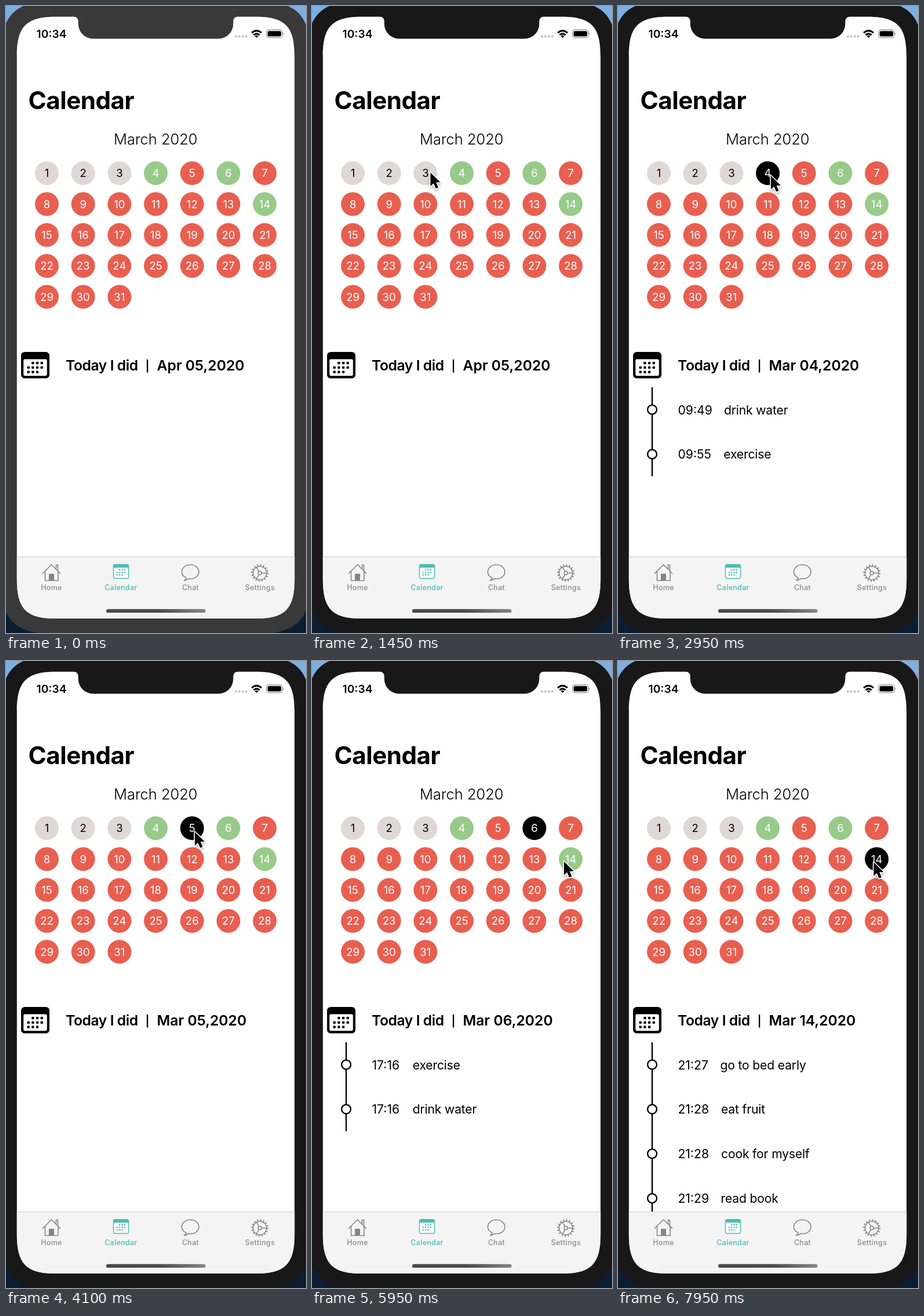
An HTML page for the animation above (8 s loop, 518x1082 px).

```html
<!DOCTYPE html>
<html lang="en">
<head>
<meta charset="utf-8">
<title>Calendar</title>
<style>
  html, body { margin: 0; width: 100%; height: 100%; overflow: hidden; background: #0c2036; }
  svg { display: block; width: 100vw; height: 100vh; font-family: Inter, Roboto, "Liberation Sans", sans-serif; }
  .mid { text-anchor: middle; }
  .day { font-size: 18.6px; }
  .heading { font-size: 24.8px; font-weight: 600; }
  .entry { font-size: 21.2px; }
  .tab { font-size: 12.6px; font-weight: 500; letter-spacing: .25px; fill: #8c8c8c; }
  .line { fill: none; stroke: #858585; stroke-width: 1.6; stroke-linejoin: round; stroke-linecap: round; }
</style>
</head>
<body>
<svg viewBox="0 0 518 1082" preserveAspectRatio="none">
  <defs>
    <linearGradient id="wall" x2="0" y2="1">
      <stop offset="0" stop-color="#7eafe2"/><stop offset=".4" stop-color="#7095bd"/>
      <stop offset=".9" stop-color="#0d2440"/><stop offset="1" stop-color="#0b1c30"/>
    </linearGradient>
    <linearGradient id="pill" x2="1" y2="0">
      <stop offset="0" stop-color="#4a4a4a"/><stop offset=".55" stop-color="#4c4c4c"/><stop offset="1" stop-color="#858585"/>
    </linearGradient>
    <clipPath id="screen"><path id="screenShape"/></clipPath>
    <filter id="soft" x="-50%" y="-50%" width="200%" height="200%">
      <feDropShadow dx="0" dy="1.5" stdDeviation="1.5" flood-opacity=".35"/>
    </filter>
  </defs>

  <rect width="518" height="1082" fill="url(#wall)"/>
  <path id="bezel"/>

  <g clip-path="url(#screen)">
    <rect x="18" y="18" width="481" height="1040" fill="#fff"/>
    <text x="38.5" y="177.5" font-size="42.2" font-weight="700" letter-spacing="-.5">Calendar</text>
    <text class="mid" x="258.3" y="239" font-size="25.6" font-weight="300" letter-spacing="-.1">March 2020</text>
    <g id="days"></g>
    <g id="agendaIcon"></g>
    <text class="heading" x="103" y="629" letter-spacing="-.5">Today I did</text>
    <rect x="243" y="610" width="2.3" height="22.5"/>
    <text class="heading" id="date" x="260.6" y="629" letter-spacing="-.1"></text>
    <g id="agenda"></g>

    <rect x="18" y="950" width="481" height="108" fill="#f4f4f4"/>
    <rect x="18" y="950" width="481" height="1.2" fill="#cfcfcf"/>
    <g class="line">
      <path d="M63.5 979 78.5 964 93.5 979M67.5 976V991.5H90V976M86.5 971V964.5H89.5V974"/>
      <path d="M74.8 991V980.5H82.2V991Z" fill="#858585"/>
      <path d="M311 986.5C306 984.5 303.5 981 303.5 976.5C303.5 969.5 310 964.3 318.3 964.3S333 969.5 333 976.5S326.5 988.5 318.3 988.5C316.8 988.5 316 988.3 315 988.1C312.5 990.5 310.5 991.3 307.5 991.5C309.8 990 310.9 988.5 311 986.5Z"/>
      <g transform="translate(438.3 978.5)" stroke-width="1.5">
        <circle r="11.6"/>
        <circle r="13.6" stroke-width="2.8" stroke-dasharray="2 3.34" stroke-linecap="butt"/>
        <circle r="3"/>
        <path d="M3 0H11.6M-1.5-2.6-5.8-10M-1.5 2.6-5.8 10"/>
      </g>
    </g>
    <g id="tabIcon"></g>
    <g id="tabs"></g>
    <rect x="173" y="1040.7" width="171.5" height="6.4" rx="3.2" fill="url(#pill)"/>
  </g>

  <path id="notch" d="M117 17V18.3A7.8 7.8 0 0 1 124.8 26V30.8A25.7 25.7 0 0 0 150.5 56.5H366.7A25.7 25.7 0 0 0 392.4 30.8V26A7.8 7.8 0 0 1 400.2 18.3V17Z"/>

  <text class="mid" x="78.5" y="54.6" font-size="19.2" font-weight="600">10:34</text>
  <g id="signal" fill="#c3c3c3"></g>
  <g fill="none" stroke="#000" stroke-width="3">
    <path d="M424.3 46.4Q432.7 38.8 441.1 46.4M427.6 50.1Q432.7 45.7 437.8 50.1"/>
    <path d="M432.7 55 429.7 52Q432.7 49.6 435.7 52Z" fill="#000" stroke="none"/>
  </g>
  <rect x="449.7" y="41.2" width="27.4" height="13.4" rx="4" fill="none" stroke="#8c8c8c" stroke-width="1.2"/>
  <rect x="451.7" y="43.2" width="23.4" height="9.4" rx="2.4"/>
  <path d="M478.5 45.5Q481 47.9 478.5 50.3Z" fill="#8c8c8c"/>

  <path id="cursor" filter="url(#soft)" stroke="#fff" stroke-width="2.2" stroke-linejoin="round" paint-order="stroke"
    d="M0 0V16.6L3.8 13 6.5 19.4 9.6 18.1 6.9 11.8H12Z"/>
</svg>
<script>
const LOOP = 8000, FOCUS = 900;
const RED = '#e85f50', GREEN = '#98ca8a', GREY = '#dfd8d6';
const byId = id => document.getElementById(id);

// Cursor waypoints: time, x, y of the tip
const path = [
  [900, 211, 296], [1300, 204.5, 287.5], [1700, 204.5, 287.5], [2200, 264, 293], [3300, 264, 293],
  [3800, 326, 295], [4500, 326, 295], [4950, 360, 296], [5200, 385, 296], [5500, 385, 296],
  [5950, 435, 346], [6400, 392, 348], [7150, 392, 348], [7350, 412.5, 348], [7600, 441.5, 347.5], [8000, 441.5, 347.5]
];
const clicks = [[2400, 4], [4000, 5], [5350, 6], [6600, 13], [7750, 14]];
// Each entry: time, activity, x of the activity
const log = {
  4: [['09:49', 'drink water', 183], ['09:55', 'exercise', 182.3]],
  6: [['17:16', 'exercise', 173.8], ['17:16', 'drink water', 173.8]],
  14: [['21:27', 'go to bed early', 176.5], ['21:28', 'eat fruit', 178],
       ['21:28', 'cook for myself', 178], ['21:29', 'read book', 177.5]]
};

const dayColor = d => d < 4 ? GREY : log[d] ? GREEN : RED;

// Rectangle with continuous-curvature corners
function smoothRect(x, y, w, h, r) {
  const reach = 1.35 * r, pull = .33 * r, far = reach - pull;
  return `M${x} ${y + reach}c0 ${-far} ${far} ${-far - 0} ${reach} ${-reach}`.replace(
    `${far} ${-far - 0} ${reach}`, `${pull} ${-reach} ${reach}`) +
    `h${w - 2 * reach}c${far} 0 ${reach} ${pull} ${reach} ${reach}` +
    `v${h - 2 * reach}c0 ${far} ${-pull} ${reach} ${-reach} ${reach}` +
    `h${2 * reach - w}c${-far} 0 ${-reach} ${-pull} ${-reach} ${-reach}Z`;
}

function calendarIcon(x, y, w, h, border, head, color) {
  const step = w * .157, size = w * .088;
  let out = `<rect x="${x}" y="${y}" width="${w}" height="${h}" rx="${w * .13}" fill="${color}"/>` +
    `<rect x="${x + border}" y="${y + head}" width="${w - 2 * border}" height="${h - head - border}" rx="${w * .05}" fill="#fff"/>`;
  for (let row = 0; row < 3; row++)
    for (let col = row ? 0 : 1; col < (row < 2 ? 4 : 3); col++)
      out += `<rect x="${x + w * .215 + col * step}" y="${y + head + h * .1 + row * step}" width="${size}" height="${size}" rx="${size * .25}" fill="${color}"/>`;
  return out;
}

function buildDays() {
  let out = '';
  for (let d = 1; d <= 31; d++) {
    const x = 70.5 + (d - 1) % 7 * 62.7, y = 288.4 + Math.floor((d - 1) / 7) * 53.35;
    out += `<circle id="day${d}" cx="${x}" cy="${y}" r="20.5" fill="${dayColor(d)}"/>` +
      `<text class="day mid" x="${x}" y="${y + 6.8}" fill="${d < 4 ? '#000' : '#fff'}">${d}</text>`;
  }
  byId('days').innerHTML = out;
}

function agendaMarkup(entries) {
  if (!entries) return '';
  const marks = entries.map(([time, what, x], i) => {
    const y = 696.5 + i * 76.9;
    return `<circle cx="59" cy="${y}" r="7.9" fill="#fff" stroke="#000" stroke-width="2.4"/>` +
      `<text class="entry" x="103.4" y="${y + 8}">${time}</text>` +
      `<text class="entry" x="${x}" y="${y + 8}" letter-spacing="-.2">${what}</text>`;
  });
  return `<path d="M59 658V${658 + entries.length * 76.7}" stroke="#000" stroke-width="2.4"/>` + marks.join('');
}

function cursorAt(t) {
  const i = path.findIndex(p => p[0] > t);
  const [t0, x0, y0] = path[i - 1], [t1, x1, y1] = path[i];
  const u = (t - t0) / (t1 - t0), e = u * u * (3 - 2 * u);
  return [x0 + (x1 - x0) * e, y0 + (y1 - y0) * e];
}

let selected = -1;
function select(day) {
  if (day === selected) return;
  if (selected > 0) byId('day' + selected).setAttribute('fill', dayColor(selected));
  if (day) byId('day' + day).setAttribute('fill', '#000');
  byId('date').textContent = day ? `Mar ${String(day).padStart(2, '0')},2020` : 'Apr 05,2020';
  byId('agenda').innerHTML = agendaMarkup(log[day]);
  selected = day;
}

function render(t) {
  const active = t >= FOCUS, shell = active ? '#181818' : '#393939';
  byId('bezel').setAttribute('fill', shell);
  byId('notch').setAttribute('fill', shell);
  const cursor = byId('cursor');
  cursor.setAttribute('visibility', active ? 'visible' : 'hidden');
  if (active) cursor.setAttribute('transform', `translate(${cursorAt(t)}) scale(1.42)`);
  select(clicks.reduce((day, [at, d]) => t >= at ? d : day, 0));
}

buildDays();
byId('bezel').setAttribute('d', smoothRect(-9, -9, 535, 1093, 72));
byId('screenShape').setAttribute('d', smoothRect(18.8, 18.4, 479.4, 1038.7, 50));
byId('agendaIcon').innerHTML = calendarIcon(26, 597, 49, 45.5, 4.2, 12.5, '#000');
byId('tabIcon').innerHTML = calendarIcon(184.8, 963, 27.6, 25.5, 1.5, 6.3, '#4dbdb4');
byId('tabs').innerHTML = ['Home', 'Calendar', 'Chat', 'Settings'].map((name, i) =>
  `<text class="tab mid" x="${78.5 + i * 120}" y="1008.3"${i === 1 ? ' style="fill:#4dbdb4"' : ''}>${name}</text>`).join('');
byId('signal').innerHTML = [0, 1, 2, 3].map(i => `<circle cx="${397 + i * 5.9}" cy="52.6" r="2.1"/>`).join('');

const start = performance.now();
function tick() {
  render((performance.now() - start) % LOOP);
  requestAnimationFrame(tick);
}
tick();
</script>
</body>
</html>
```
